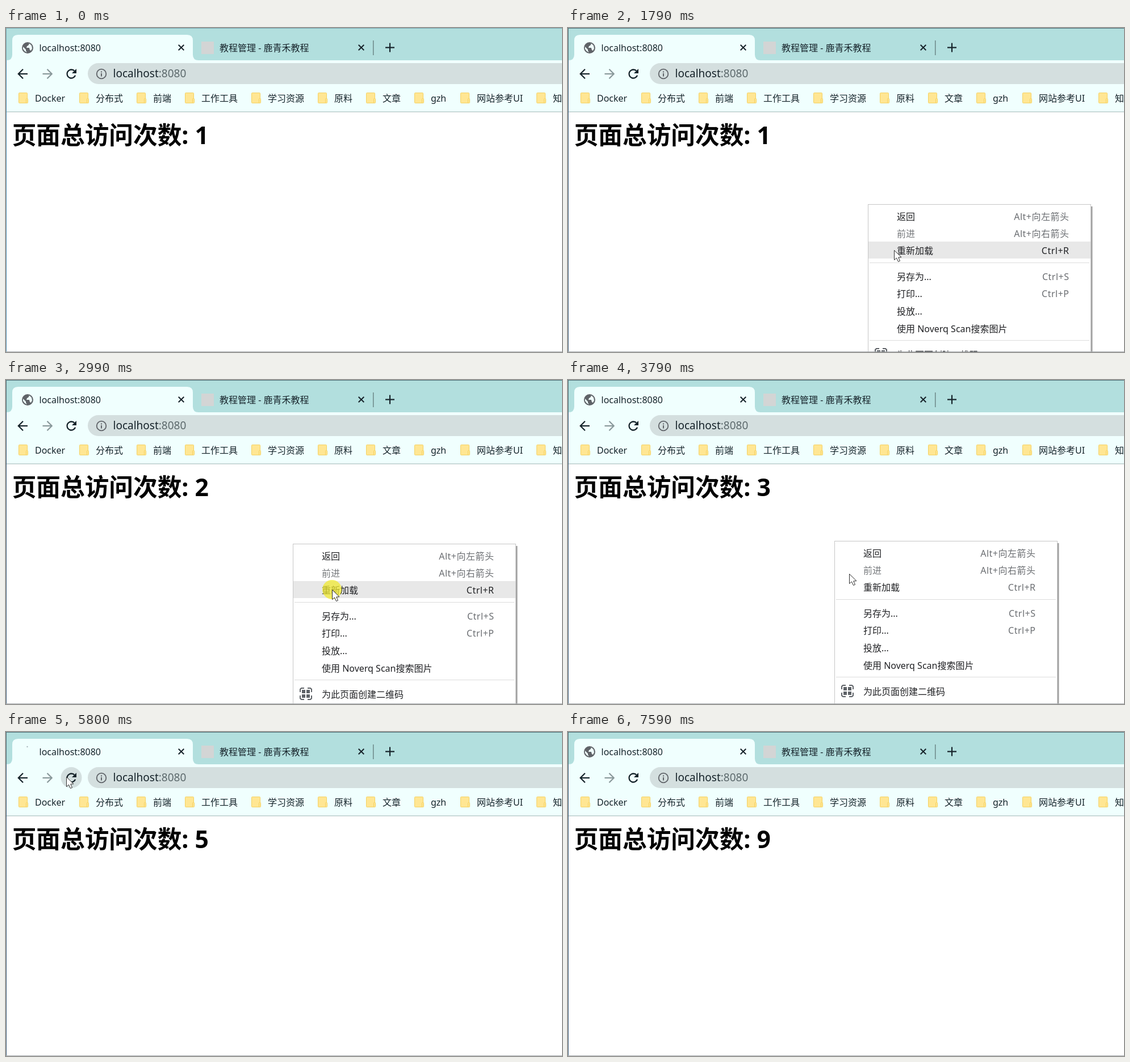
An HTML page with a canvas for the animation above (8.41 s loop, 979 by 572 pixels).

```html
<!DOCTYPE html>
<html lang="zh-CN">
<head>
<meta charset="utf-8">
<title>页面访问计数</title>
<style>
html, body { margin: 0; width: 100%; height: 100%; overflow: hidden; background: #fff; }
canvas { display: block; }
</style>
</head>
<body>
<canvas id="stage" width="979" height="572"></canvas>
<script>
const ctx = document.getElementById('stage').getContext('2d');
const W = 979, H = 572, LOOP = 8410;
const FONT = '"Noto Sans", "Noto Sans CJK SC", "Noto Sans CJK", sans-serif';
const INK = '#16232a', GREY = '#5f6368';

// Each step lists only what changes at that moment.
const steps = [
  [0, { count: 1, active: false, cursor: null, click: false, menu: null, loading: false, stop: false }],
  [370, { active: true, cursor: [700, 420] }],
  [570, { cursor: [590, 350] }],
  [770, { cursor: [528, 311] }],
  [970, { click: true }],
  [1170, { click: false, menu: [528, 311] }],
  [1370, { cursor: [552, 352] }],
  [1590, { cursor: [570, 385] }],
  [1790, { cursor: [574, 392] }],
  [1990, { click: true }],
  [2190, { click: false, menu: null, loading: true }],
  [2390, { loading: false, count: 2, cursor: [520, 310] }],
  [2590, { cursor: [505, 289], menu: [505, 289] }],
  [2790, { cursor: [570, 362] }],
  [2990, { cursor: [574, 370], click: true }],
  [3190, { click: false, menu: null, count: 3 }],
  [3390, { cursor: [500, 310] }],
  [3590, { cursor: [469, 284], click: true }],
  [3790, { click: false, menu: [469, 284], cursor: [495, 342] }],
  [3990, { cursor: [510, 362] }],
  [4190, { cursor: [522, 377] }],
  [4410, { click: true }],
  [4610, { click: false, menu: null, stop: true }],
  [4810, { stop: false, count: 4, cursor: [330, 240] }],
  [5010, { cursor: [150, 110] }],
  [5210, { cursor: [106, 79] }],
  [5410, { click: true }],
  [5600, { click: false, count: 5 }],
  [5800, { loading: true }],
  [6000, { loading: false, click: true }],
  [6200, { click: false, count: 6 }],
  [6400, { click: true, count: 7 }],
  [6600, { click: false, count: 8 }],
  [6790, { click: true }],
  [6990, { click: false, count: 9 }],
  [7190, { cursor: [957, 330] }],
  [7390, { cursor: [833, 466] }],
  [7590, { cursor: null }]
];

const bookmarks = [
  [22, 'Docker'], [129, '分布式'], [230, '前端'], [315, '工作工具'], [432, '学习资源'],
  [549, '原料'], [634, '文章'], [719, 'gzh'], [800, '网站参考UI'], [934, '知识']
];

// Vertical centre from the menu top, label, shortcut
const menuItems = [
  [22, '返回', 'Alt+向左箭头'],
  [52, '前进', 'Alt+向右箭头'],
  [82, '重新加载', 'Ctrl+R'],
  [128, '另存为...', 'Ctrl+S'],
  [158, '打印...', 'Ctrl+P'],
  [189, '投放...', ''],
  [220, '使用 Noverq Scan搜索图片', ''],
  [266, '为此页面创建二维码', '']
];

function stateAt(t) {
  const state = {};
  for (const [start, change] of steps) {
    if (start > t) break;
    Object.assign(state, change);
  }
  return state;
}

function rect(x, y, w, h, color) {
  ctx.fillStyle = color;
  ctx.fillRect(x, y, w, h);
}

function disc(x, y, r, color) {
  ctx.fillStyle = color;
  ctx.beginPath();
  ctx.arc(x, y, r, 0, 7);
  ctx.fill();
}

function path(points, close) {
  ctx.beginPath();
  points.forEach(([x, y], i) => i ? ctx.lineTo(x, y) : ctx.moveTo(x, y));
  if (close) ctx.closePath();
}

function line(points, color, width) {
  path(points);
  ctx.strokeStyle = color;
  ctx.lineWidth = width;
  ctx.stroke();
}

function text(str, x, y, color, size = 16, weight = 400) {
  ctx.font = `${weight} ${size}px ${FONT}`;
  ctx.fillStyle = color;
  ctx.fillText(str, x, y);
}

function cross(x, y, r, color, width) {
  line([[x - r, y - r], [x + r, y + r]], color, width);
  line([[x + r, y - r], [x - r, y + r]], color, width);
}

function globe(x, y) {
  disc(x, y, 10, GREY);
  ctx.fillStyle = '#f0fffe';
  path([[x - 8, y - 2], [x - 3, y + 3], [x - 3, y + 5], [x - 1, y + 8], [x - 5, y + 6], [x - 8, y + 2]], true);
  ctx.fill();
  path([[x + 1, y - 8], [x + 3, y - 7], [x + 1, y - 4], [x - 1, y - 3], [x - 2, y], [x + 3, y],
    [x + 4, y + 4], [x + 6, y + 5], [x + 8, y + 1], [x + 7, y - 4], [x + 4, y - 7]], true);
  ctx.fill();
}

function tabs(state) {
  rect(0, 0, W, 57, '#b2dfde');
  ctx.fillStyle = '#f0fffe';
  ctx.beginPath();
  ctx.moveTo(1, 57);
  ctx.quadraticCurveTo(11, 57, 11, 47);
  ctx.lineTo(11, 22);
  ctx.quadraticCurveTo(11, 12, 21, 12);
  ctx.lineTo(319, 12);
  ctx.quadraticCurveTo(329, 12, 329, 22);
  ctx.lineTo(329, 47);
  ctx.quadraticCurveTo(329, 57, 339, 57);
  ctx.fill();
  if (state.loading) disc(37.5, 26, 1.2, '#a9b8bc');
  else globe(38, 35);
  text('localhost:8080', 58.5, 41, INK);
  cross(308.5, 34.5, 4.8, INK, 2);
  rect(344, 24, 22, 22, '#d3d5d5');
  text('教程管理 - 鹿青禾教程', 376, 41, INK);
  cross(625.5, 34.5, 4.8, INK, 2);
  rect(646, 22, 1.5, 26, '#6d8888');
  line([[668, 34.5], [684, 34.5]], INK, 2.2);
  line([[676, 26.5], [676, 42.5]], INK, 2.2);
}

function arrow(x, dir, color) {
  line([[x - 8.5 * dir, 81], [x + 8 * dir, 81]], color, 2.2);
  line([[x, 72.8], [x - 8.2 * dir, 81], [x, 89.2]], color, 2.2);
}

function reloadButton(state) {
  const c = state.cursor;
  if (c && Math.hypot(c[0] - 115, c[1] - 80.5) < 18) disc(115, 80.5, 18.5, '#d3dfdf');
  if (state.stop) {
    cross(115, 81, 6.5, INK, 2.2);
    return;
  }
  ctx.strokeStyle = INK;
  ctx.lineWidth = 2.3;
  ctx.beginPath();
  ctx.arc(115, 81, 7.5, 0.35, 5.5);
  ctx.stroke();
  ctx.fillStyle = INK;
  path([[124, 72], [124, 80], [116, 80]], true);
  ctx.fill();
}

function folder(x) {
  ctx.fillStyle = '#ffe693';
  ctx.strokeStyle = '#f5d162';
  ctx.lineWidth = 1;
  ctx.beginPath();
  ctx.roundRect(x + 0.5, 114.5, 15, 18, 1);
  ctx.fill();
  ctx.stroke();
  ctx.beginPath();
  ctx.roundRect(x + 13.5, 124.5, 3, 8, 1);
  ctx.fill();
  ctx.stroke();
}

function toolbar(state) {
  rect(0, 57, W, 91, '#f0fffe');
  arrow(30, 1, INK);
  arrow(72.5, -1, '#89989a');
  reloadButton(state);
  ctx.fillStyle = '#d4dfdf';
  ctx.beginPath();
  ctx.roundRect(144, 62, 900, 37, 18.5);
  ctx.fill();
  ctx.strokeStyle = GREY;
  ctx.lineWidth = 1.8;
  ctx.beginPath();
  ctx.arc(168, 81, 8.3, 0, 7);
  ctx.stroke();
  rect(167, 80, 2, 5.5, GREY);
  rect(167, 76.5, 2, 2, GREY);
  text('localhost', 188.5, 87, INK, 19);
  const hostWidth = ctx.measureText('localhost').width;
  text(':8080', 188.5 + hostWidth, 87, '#5c696c', 19);
  for (const [x, label] of bookmarks) {
    folder(x);
    text(label, x + 29, 130, INK);
  }
  rect(0, 147.5, W, 1, '#9eb3b4');
}

function gridIcon(x, y) {
  for (const sx of [-1, 1]) {
    for (const sy of [-1, 1]) {
      ctx.fillStyle = GREY;
      ctx.fillRect(x + sx * 4 - 3, y + sy * 4 - 3, 6, 6);
      line([[x + sx * 3, y + sy * 10], [x + sx * 8, y + sy * 10], [x + sx * 10, y + sy * 8], [x + sx * 10, y + sy * 3]], GREY, 2);
    }
  }
}

function contextMenu(state) {
  const [x, y] = state.menu;
  const overReload = state.cursor[1] >= y + 66 && state.cursor[1] < y + 96;
  rect(x + 4, y + 4, 392, H, '#d2d2d2');
  rect(x + 4, y + 4, 391, H, '#a2a2a2');
  rect(x, y, 393, H, '#c6c6c6');
  rect(x + 1, y + 1, 391, H, '#fff');
  if (overReload) rect(x + 1, y + 66, 391, 30, '#e8e8e8');
  for (const dy of [103, 240]) rect(x + 3, y + dy, 387, 1, '#dcdcdc');
  menuItems.forEach(([dy, label, keys], i) => {
    text(label, x + 51, y + dy + 6, i === 1 ? '#75787b' : '#202124');
    if (!keys) return;
    ctx.textAlign = 'right';
    ctx.letterSpacing = '0.5px';
    text(keys, x + 354.5, y + dy + 6, overReload && i === 2 ? '#202124' : '#6a6d71');
    ctx.textAlign = 'left';
    ctx.letterSpacing = '0px';
  });
  gridIcon(x + 23, y + 265);
}

function pointer(state) {
  const [x, y] = state.cursor;
  if (state.click) disc(x, y, 17, 'rgba(242, 234, 45, 0.72)');
  const shape = [[0, 0], [0, 17], [4, 13.5], [7, 20], [10, 18.7], [7.2, 12.5], [12.5, 12.2]];
  path(shape.map(([dx, dy]) => [x + dx + 0.5, y + dy + 0.5]), true);
  ctx.fillStyle = '#fff';
  ctx.fill();
  ctx.strokeStyle = '#303030';
  ctx.lineWidth = 1;
  ctx.stroke();
}

function windowEdge(active) {
  const color = active ? '#3f5f7c' : '#4f8fb3';
  rect(0, 0, W, 1, active ? '#4d7078' : '#78a9b2');
  rect(0, 57, 1, H, color);
  rect(0, 0, 1, 57, active ? '#4d7078' : '#78a9b2');
  rect(0, H - 1, W, 1, '#a9adb0');
}

function draw(t) {
  const state = stateAt(t);
  rect(0, 0, W, H, '#fff');
  tabs(state);
  toolbar(state);
  text('页面总访问次数: ' + state.count, 10.7, 205, '#000', 42.67, 700);
  if (state.menu) contextMenu(state);
  windowEdge(state.active);
  if (state.cursor) pointer(state);
}

const begin = performance.now();
function tick() {
  draw((performance.now() - begin) % LOOP);
  requestAnimationFrame(tick);
}
tick();
</script>
</body>
</html>
```
